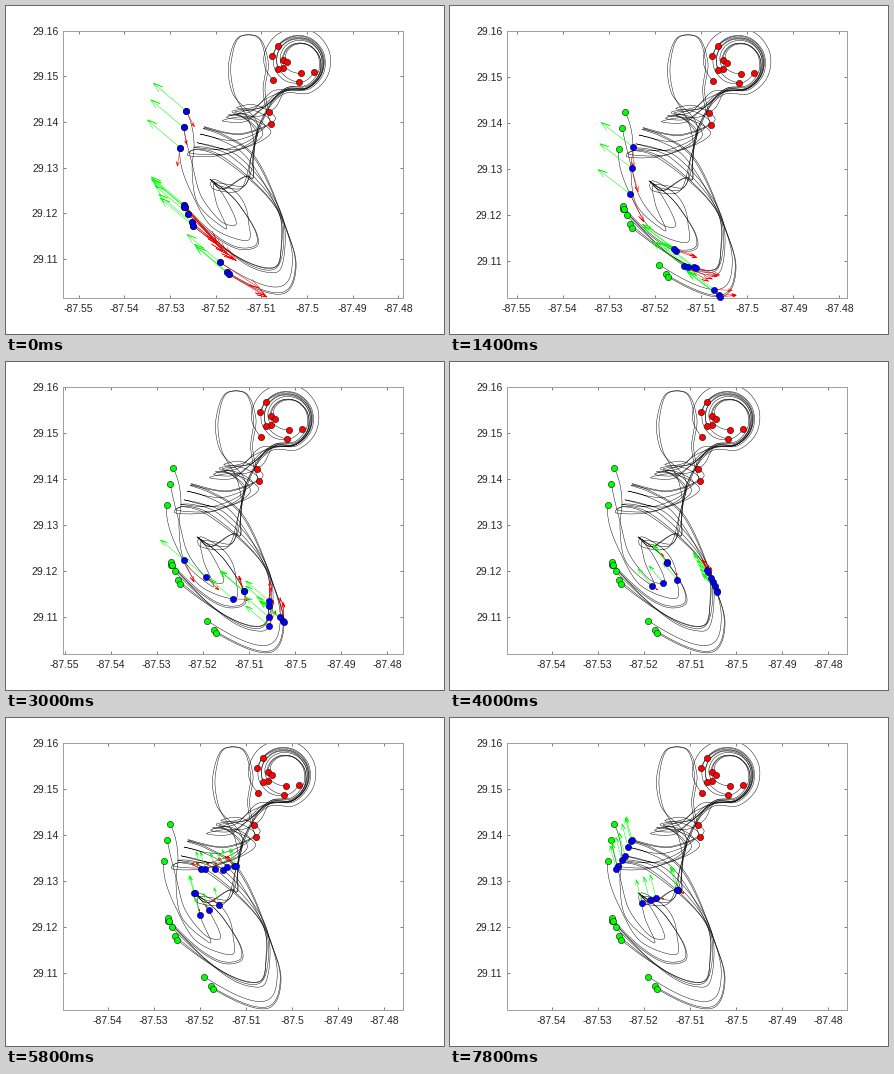
Write a matplotlib script that moves like this. It is 438 by 328 pixels and loops after 8000 ms.

```python
import numpy as np
import matplotlib.pyplot as plt
from matplotlib.animation import FuncAnimation

W, H, DPI = 438, 328, 100
FRAMES, STEP = 40, 200
PX = 72 / DPI                       # points per pixel
LEFT, RIGHT, TOP, BOTTOM = 57, 396.5, 24.6, 291.6
SCALE = 4610                        # chart pixels per degree
INK = "#262626"
KNOTS = np.array([0, 1.4, 2.2, 3.0, 4.0, 5.8, 6.8, 7.8])

plt.rcParams["font.family"] = "Liberation Sans"
plt.rcParams["font.size"] = 10.4 * PX
plt.rcParams["path.simplify"] = False
rng = np.random.default_rng(4)


def to_map(p):
    """Chart pixels to longitude and latitude."""
    p = np.asarray(p, float)
    return np.stack([-87.5 + (p[..., 0] - 286) / SCALE,
                     29.16 - (p[..., 1] - 24.8) / SCALE], -1)


def arc(centre, radii, angles):
    """Points on an ellipse, angles in degrees, upwards positive."""
    a = np.radians(angles)
    return np.array(centre) + np.stack([np.cos(a), -np.sin(a)], -1) * radii


def blend(guides, lane):
    """Path at a fractional place between neighbouring guides."""
    g = np.array(guides, float)
    i = min(int(lane), len(g) - 2)
    return g[i] + (g[i + 1] - g[i]) * (lane - i)


def fold(start):
    """Swing right, back left and right again while climbing."""
    reach = 33 + rng.normal(0, 3)
    centre = start + [reach, 0]
    goal = np.array([238, 98]) + rng.normal(0, 6, 2)
    return [arc(centre + (goal - centre) * k / 6,
                reach * (1 - k / 9) * np.array([1, 0.35]), 180 + 90 * k)
            for k in range(1, 7)]


def rise(start):
    """Slip out of the eddy on its right side and climb."""
    bend = start + np.array([232 - start[0], 10]) * [0.6, 0.2]
    return [bend, [231 + rng.normal(0, 2), 152],
            [237 + rng.normal(0, 5), 120]]


def spiral(end):
    """Wind anticlockwise into a final place."""
    eye = np.array([276, 56])
    dx, dy = end - eye
    last = np.degrees(np.arctan2(-dy, dx))
    turn = (last + 110) % 360
    turn += 360 * (turn < 90)
    k = np.linspace(0, 1, int(turn / 45) + 2)[:-1]
    radius = 31 + rng.normal(0, 2) + (np.hypot(dx, dy) - 31) * k
    return [*arc(eye, radius[:, None], last - turn * (1 - k)), end]


def big_loop(end):
    size = 1 + rng.normal(0, 0.08)
    return [*arc([227, 65], [18 * size, 38], np.arange(215, -40, -50)), end]


class Drifter:
    """Smooth timed path: key points first, then the way home."""

    def __init__(self, keys, home):
        self.p = np.vstack([keys, home])
        n = len(keys)
        hops = np.linalg.norm(np.diff(self.p[n - 1:], axis=0), axis=1)
        self.t = np.append(KNOTS, KNOTS[-1] + np.cumsum(hops / 30 + 0.05))
        self.m = np.gradient(self.p, self.t, axis=0, edge_order=2)

    def at(self, t):
        t = np.atleast_1d(t)
        i = np.clip(np.searchsorted(self.t, t, "right") - 1, 0, len(self.t) - 2)
        h = (self.t[i + 1] - self.t[i])[:, None]
        u = (t - self.t[i])[:, None] / h
        a, b = self.p[i], self.p[i + 1]
        ma, mb = self.m[i] * h, self.m[i + 1] * h
        pos = ((2 * u**3 - 3 * u**2 + 1) * a + (u**3 - 2 * u**2 + u) * ma
               + (3 * u**2 - 2 * u**3) * b + (u**3 - u**2) * mb)
        vel = (6 * (u**2 - u) * (a - b) + (3 * u**2 - 4 * u + 1) * ma
               + (3 * u**2 - 2 * u) * mb) / h
        return pos, vel


# guides round the inner eddy, slow to fast
slow = [(164, 106), (172, 141), (170, 166), (175, 198),
        (202, 224), (194, 197), (192, 180), (206, 180)]
middle = [(158, 143), (169, 188), (190, 223), (224, 237),
          (227, 218), (213, 187), (192, 175), (192, 185)]
fast = [(162, 203), (215, 245), (235, 243), (235, 229),
        (217, 200), (188, 175), (202, 185), (228, 172)]

# guides along the outer sweep, west to south
west = [(163, 203), (223, 260), (247, 269), (260, 264),
        (263, 220), (217, 152), (193, 142), (175, 138)]
lead = [(171, 222), (235, 262), (256, 262), (260, 239),
        (257, 208), (195, 151), (173, 145), (166, 151)]
south = [(207, 271), (259, 291), (271, 282), (275, 260),
         (267, 230), (230, 148), (202, 130), (182, 122)]

far_ends = np.array([(248, 107), (250, 119)])
eye_ends = np.array([(280, 68), (252, 75), (278, 77), (262, 54), (266, 57),
                     (262, 63), (257, 64), (293, 67), (257, 40), (251, 50)])

fleet = []
for lane, end in zip([0, 0.45, 1, 2, 1.96], [*far_ends, *eye_ends]):
    keys = blend([slow, middle, fast], lane)
    finish = big_loop if lane < 1 else spiral
    fleet.append(Drifter(keys, rise(keys[-1]) + finish(end)))
for lane, end in zip([0, 0.35, 0.8, 1, 1.75, 1.95, 2], eye_ends[3:]):
    keys = blend([west, lead, south], lane)
    fleet.append(Drifter(keys, fold(keys[-1]) + spiral(end)))


def wind(t):
    key = [0, 2.2, 4, 5.8, 7.8]
    return np.array([np.interp(t, key, [-33, -31, -14, -5, -6]),
                     np.interp(t, key, [-28, -22, -17, -17, -23])])


def arrows(base, vec):
    """Shafts and open heads as one broken line."""
    tip = base + vec
    side = np.stack([vec[:, 1], -vec[:, 0]], -1) * 0.33
    gap = np.full_like(base, np.nan)
    parts = [base, tip, tip - 0.22 * (vec + side), tip,
             tip - 0.22 * (vec - side), gap]
    return to_map(np.stack(parts, 1).reshape(-1, 2)).T


fig = plt.figure(figsize=(W / DPI, H / DPI), dpi=DPI, facecolor="white")
ax = fig.add_axes([LEFT / W, 1 - BOTTOM / H,
                   (RIGHT - LEFT) / W, (BOTTOM - TOP) / H])
for spine in ax.spines.values():
    spine.set(linewidth=PX, color="#a0a0a0")
ax.tick_params(direction="in", length=3.4 * PX, width=PX, color="#808080",
               labelcolor=INK, top=True, right=True)
ax.tick_params(axis="x", pad=6.7 * PX)
ax.tick_params(axis="y", pad=4.8 * PX)


def line(color):
    return ax.plot([], [], color=color, lw=0.5 * PX, zorder=3)[0]


def dots(points, color, z):
    x, y = to_map(points).T
    return ax.plot(x, y, "o", ms=6.3 * PX, mfc=color, mec="black",
                   mew=0.5 * PX, clip_on=False, zorder=z)[0]


for d in fleet:
    x, y = to_map(d.at(np.linspace(0, d.t[-1], 400))[0]).T
    ax.plot(x, y, color="black", lw=0.45 * PX, zorder=1)
dots([d.p[0] for d in fleet], "lime", 2)
dots([d.p[-1] for d in fleet], "red", 2)
now = dots([d.p[0] for d in fleet], "blue", 4)
flow, breeze = line("red"), line("lime")


def frame_axes(t):
    mid = np.interp(t, [0, 1.4, 2.2, 3, 3.6], [301, 297, 296, 289, 286])
    scale = np.interp(t, [0, 1.4], [4565, SCALE])
    x0, x1 = -87.5 + (LEFT - mid) / scale, -87.5 + (RIGHT - mid) / scale
    y0 = 29.16 - (BOTTOM - TOP) / scale
    xs = np.arange(np.ceil(x0 * 100), np.floor(x1 * 100) + 1) / 100
    ys = np.arange(np.ceil(y0 * 100), 2917) / 100
    ax.set_xticks(xs, [f"{v:.4g}" for v in xs])
    ax.set_yticks(ys, [f"{v:.4g}" for v in ys])
    ax.set_xlim(x0, x1)
    ax.set_ylim(y0, 29.16)


def draw(i):
    t = i * STEP / 1000
    state = [d.at(t) for d in fleet]
    pos = np.array([s[0][0] for s in state])
    vel = np.array([s[1][0] for s in state])
    reach = np.interp(t, [0, 3, 4], [0.75, 0.65, 0.35])
    frame_axes(t)
    now.set_data(*to_map(pos).T)
    flow.set_data(*arrows(pos, vel * reach))
    breeze.set_data(*arrows(pos, np.tile(wind(t), (len(pos), 1))))
    return now, flow, breeze


anim = FuncAnimation(fig, draw, frames=FRAMES, interval=STEP,
                     repeat=True, repeat_delay=0, blit=False)
plt.show()
```
